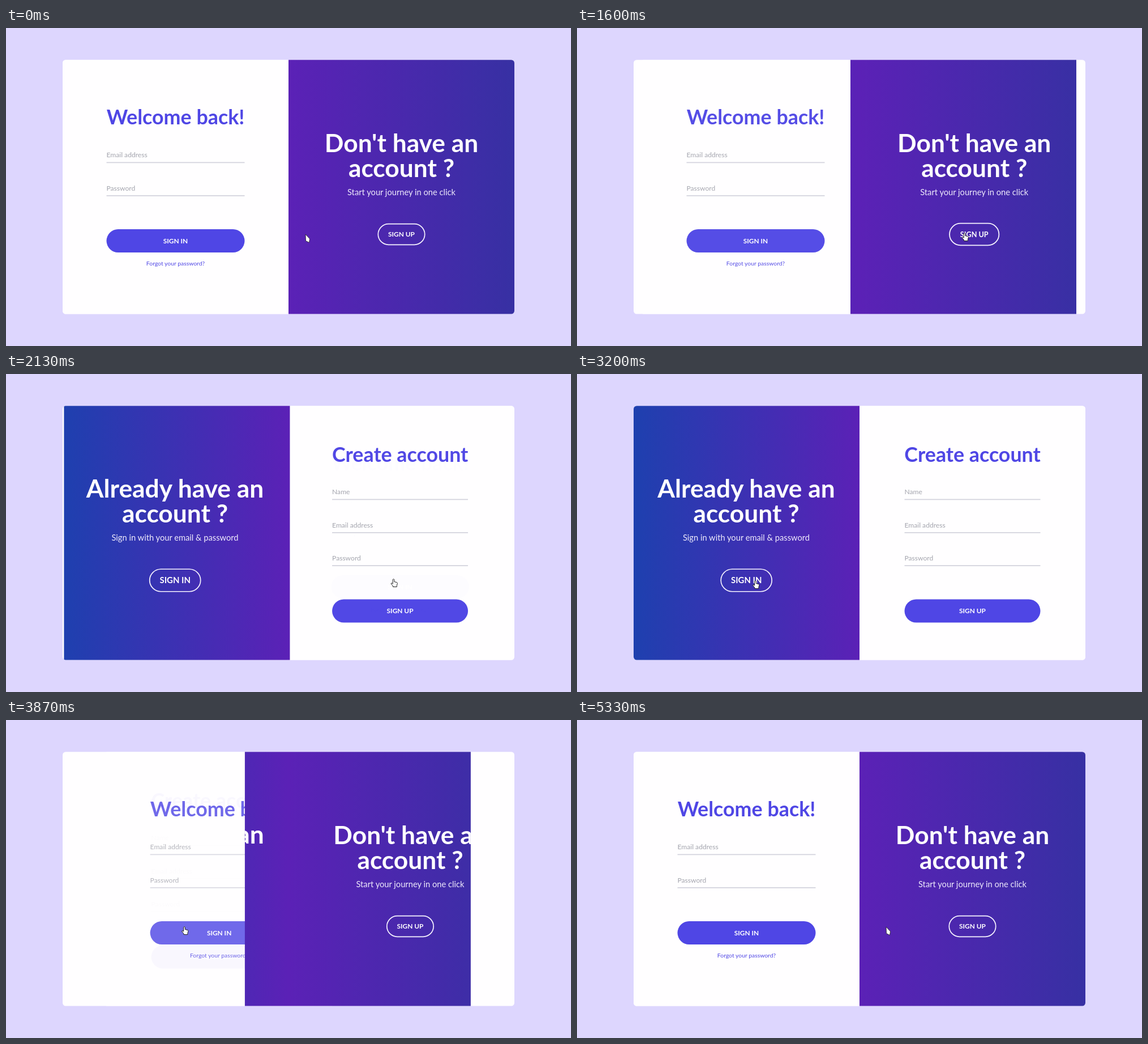
An HTML page for the animation above (5.39 s loop, 998x561 px).

```html
<!DOCTYPE html>
<html lang="en">
<head>
<meta charset="utf-8">
<title>Sliding sign-in form</title>
<style>
  html, body { margin: 0; height: 100%; overflow: hidden; background: #ddd6fe; }
  svg { display: block; width: 100vw; height: 100vh; font-family: Lato, sans-serif; }
  .mid { text-anchor: middle; }
  .bold { font-weight: 700; }
  .title { font-size: 35.8px; fill: #4f46e5; }
  .hint { font-size: 12.1px; fill: #a3a4ad; }
  .rule { stroke: #d3d3dd; stroke-width: 1.7; }
  .button { font-size: 11.9px; fill: #fff; }
  .forgot { font-size: 10.4px; fill: #4f46e5; }
  .banner { font-size: 44.3px; fill: #fff; }
  .sub { font-size: 14.7px; fill: #efebfc; }
  .pill { fill: none; stroke: #f6f3ff; stroke-width: 1.7; }
</style>
</head>
<body>
<svg id="stage" viewBox="0 0 998 561"></svg>
<script>
const LOOP = 5390, WIDTH = 399, SLIDE = 684, TO_SIGN_UP = 1518, TO_SIGN_IN = 3511;

const text = (x, y, cls, str) => `<text x="${x}" y="${y}" class="${cls}">${str}</text>`;

const field = (x, y, w, label) => text(x, y - 9.2, 'hint', label) +
  `<path class="rule" d="M${x} ${y}h${w}"/>`;

const solidButton = (x, y, w, label) =>
  `<rect x="${x}" y="${y}" width="${w}" height="41" rx="20.5" fill="#4f46e5"/>` +
  text(x + w / 2, y + 24.8, 'mid bold button', label);

const banner = (x, y, lines, sub) =>
  text(x, y, 'mid bold banner', lines[0]) +
  text(x, y + 44, 'mid bold banner', lines[1]) +
  text(x, y + 76, 'mid sub', sub);

const pill = (w, h, size, label) =>
  `<rect class="pill" x="${-w / 2}" y="${-h / 2}" width="${w}" height="${h}" rx="${h / 2}"/>
   <text y="${size * 0.36}" class="mid bold button" style="font-size:${size}px">${label}</text>`;

stage.innerHTML = `
<defs>
  <linearGradient id="blend" gradientUnits="userSpaceOnUse" x1="100" x2="898" y1="0" y2="0">
    <stop stop-color="#1e40af"/>
    <stop offset=".5" stop-color="#5b21b6"/>
    <stop offset="1" stop-color="#3730a3"/>
  </linearGradient>
  <clipPath id="card"><rect x="100" y="56.2" width="798" height="448.4" rx="5.5"/></clipPath>
  <clipPath id="window"><rect id="pane" y="56" width="${WIDTH}" height="449"/></clipPath>
</defs>
<rect width="998" height="561" fill="#ddd6fe"/>
<g clip-path="url(#card)">
  <rect x="100" y="56" width="798" height="449" fill="#fffeff"/>
  <g id="signUp">
    <rect x="499" y="56" width="${WIDTH}" height="449" fill="#fffeff"/>
    ${text(698.6, 154.5, 'mid bold title', 'Create account')}
    ${field(578.5, 221.4, 240, 'Name')}
    ${field(578.5, 279.8, 240, 'Email address')}
    ${field(578.5, 338.2, 240, 'Password')}
    ${solidButton(578.5, 397.5, 240, 'SIGN UP')}
  </g>
  <g id="signIn">
    <rect x="100" y="56" width="${WIDTH}" height="449" fill="#fffeff"/>
    ${text(299.5, 170, 'mid bold title', 'Welcome back!')}
    ${field(177.5, 237.4, 244, 'Email address')}
    ${field(177.5, 295.8, 244, 'Password')}
    ${solidButton(177.5, 355, 244, 'SIGN IN')}
    ${text(299.5, 418.6, 'mid forgot', 'Forgot your password?')}
  </g>
  <g clip-path="url(#window)">
    <rect x="100" y="56" width="798" height="449" fill="url(#blend)"/>
    <g id="leftPanel">
      ${banner(299, 217.5, ['Already have an', 'account ?'], 'Sign in with your email &amp; password')}
      <g transform="translate(299.2 364)">${pill(90, 39.5, 14.9, 'SIGN IN')}</g>
    </g>
    <g id="rightPanel">
      ${banner(698.5, 219, ["Don't have an", 'account ?'], 'Start your journey in one click')}
      <g id="upPill">${pill(82.4, 36.6, 11.9, 'SIGN UP')}</g>
    </g>
  </g>
</g>
<g id="cursor" stroke="#222" stroke-linejoin="round">
  <path id="arrow" fill="#fff" stroke-width=".8" d="M0 0L7.5 8L6.5 14.5L.5 11.5Z"/>
  <path id="hand" fill="#fff" d="M-1.3 1Q0-.8 1.3 1V5L6 6.2Q7 6.6 6.8 8L5.8 12V14H-1V12.4L-4.3 8.6Q-4.4 7-2.8 7.4L-1.3 8.6Z"/>
</g>`;

const $ = id => document.getElementById(id);
const clamp = v => Math.min(1, Math.max(0, v));
const smooth = v => (v = clamp(v), v * v * (3 - 2 * v));
const move = (id, x, y = 0, extra = '') =>
  $(id).setAttribute('transform', `translate(${x} ${y})${extra}`);

// cubic-bezier(.4, 0, .2, 1), solved by bisection
function ease(p) {
  p = clamp(p);
  let lo = 0, hi = 1;
  for (let i = 0; i < 24; i++) {
    const s = (lo + hi) / 2, r = 1 - s;
    if (1.2 * r * r * s + 0.6 * r * s * s + s ** 3 < p) lo = s; else hi = s;
  }
  return lo * lo * (3 - 2 * lo);
}

// start, end, x, y of each pointer trip
const trips = [[250, 1050, 684.5, 361.5], [2450, 3050, 315, 364.5], [4330, 5100, 546, 365]];

function pointer(t) {
  let x = 529, y = 364;
  for (const [start, end, toX, toY] of trips) {
    const k = smooth((t - start) / (end - start));
    x += (toX - x) * k;
    y += (toY - y) * k;
  }
  return [x, y];
}

function draw(t) {
  const back = t >= TO_SIGN_IN;
  const k = back ? 1 - ease((t - TO_SIGN_IN) / SLIDE) : ease((t - TO_SIGN_UP) / SLIDE);
  move('signIn', WIDTH * k);
  $('signIn').setAttribute('opacity', 1 - k);
  move('signUp', WIDTH * (k - 1));
  $('signUp').setAttribute('opacity', k);
  $('pane').setAttribute('x', 499 - WIDTH * k);
  move('leftPanel', back ? 0 : -80 * (1 - k));
  move('rightPanel', 80 * k);

  const hover = smooth((t - 880) / 150) * (t < 2450);
  move('upPill', 698.5, 364, ` scale(${1 + 0.06 * hover})`);

  const [x, y] = pointer(t);
  const onButton = t < 2450 ? x > 657 : x < (back ? 421 : 345);
  move('cursor', x, y);
  $('hand').setAttribute('visibility', onButton ? 'visible' : 'hidden');
  $('arrow').setAttribute('visibility', onButton ? 'hidden' : 'visible');
}

const begin = performance.now();
function tick() {
  draw((performance.now() - begin) % LOOP);
  requestAnimationFrame(tick);
}
tick();
</script>
</body>
</html>
```
